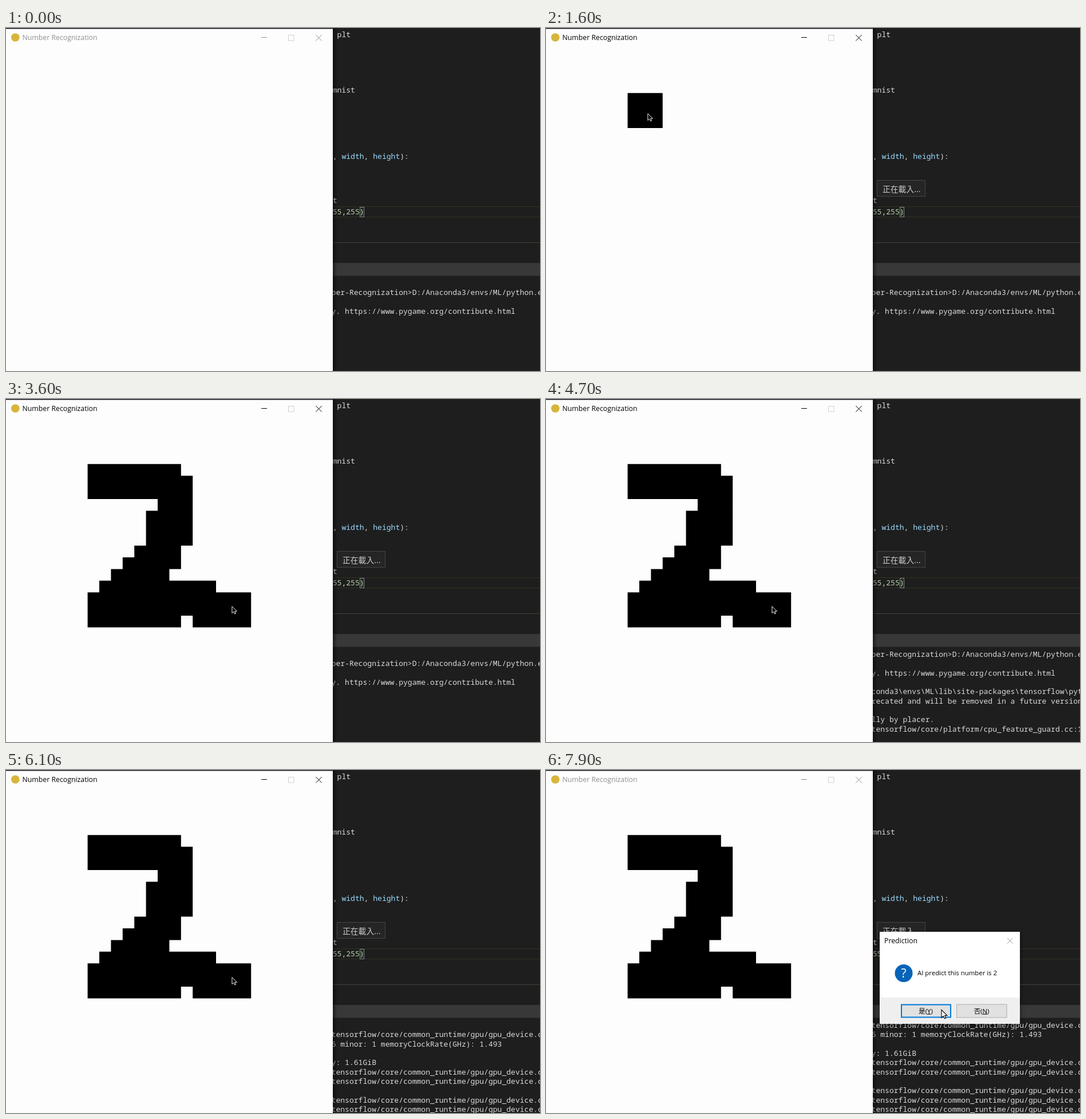
These frames come from a looping animation (933x600 px, 8 s). An HTML page:

```html
<!DOCTYPE html>
<html lang="en">
<head>
<meta charset="utf-8">
<title>Number Recognization</title>
<style>
  html, body { margin: 0; width: 100%; height: 100%; overflow: hidden; background: #1e1e1e; }
  svg { display: block; width: 933px; height: 600px; }
  text { white-space: pre; }
  .code { font: 13.07px "Noto Sans Mono", monospace; fill: #dadada; }
  .ui { font: 12.3px "Open Sans", sans-serif; }
  .small { font: 11.4px "Open Sans", "Noto Sans CJK TC", "Noto Sans CJK", sans-serif; }
  .cjk { font-family: "Noto Sans CJK TC", "Noto Sans CJK", sans-serif; }
  .param { fill: #9cdcfe; }
  .number { fill: #b5cea8; }
  .key { text-decoration: underline; }
  #dialog { filter: drop-shadow(0 2px 4px #0008); }
</style>
</head>
<body>
<svg viewBox="0 0 933 600">
  <defs>
    <linearGradient id="shade">
      <stop stop-color="#000" stop-opacity=".45"/>
      <stop offset="1" stop-color="#000" stop-opacity="0"/>
    </linearGradient>
  </defs>
  <rect width="933" height="600" fill="#1e1e1e"/>

  <!-- editor -->
  <path d="M571 312.5H933M571 330.5H933" stroke="#323226"/>
  <path d="M571 375.5H933" stroke="#42423a"/>
  <rect x="571" y="411" width="362" height="22.5" fill="#383838"/>
  <rect x="618.5" y="313.5" width="7" height="17" fill="#1c2a1c" stroke="#888"/>
  <g class="code">
    <text x="578.6" y="16">plt</text>
    <text x="570.7" y="113">mnist</text>
    <text x="570.7" y="229">, <tspan class="param">width</tspan>, <tspan class="param">height</tspan>):</text>
    <text x="570.7" y="306">t</text>
    <text x="570.7" y="326"><tspan class="number">55</tspan>,<tspan class="number">255</tspan>)</text>
  </g>
  <g id="tooltip">
    <rect x="578.5" y="266.5" width="84" height="28" fill="#252526" stroke="#454545"/>
    <text class="cjk" x="588" y="287" font-size="13.8" fill="#ccc">正在載入...</text>
  </g>
  <g id="terminal" class="code"></g>

  <!-- drawing window -->
  <rect x="571" width="8" height="600" fill="url(#shade)"/>
  <rect width="571" height="2" fill="#15151c"/>
  <rect y="1.5" width="571" height="599" fill="#fdfdfd"/>
  <circle cx="16.3" cy="16.5" r="7.3" fill="#d6b53c"/>
  <g id="titlebar">
    <text class="ui" x="28.5" y="21">Number Recognization</text>
    <path d="M446 16.5H456M541.3 12L551.7 22.4M551.7 12L541.3 22.4" stroke="currentColor" fill="none"/>
  </g>
  <rect x="493.5" y="12.5" width="9.5" height="9.5" fill="none" stroke="#d0d0d0"/>
  <path id="ink"/>

  <!-- message box -->
  <g id="dialog">
    <rect x="583" y="283" width="245" height="161" fill="#fff"/>
    <rect x="583" y="398" width="245" height="46" fill="#efefef"/>
    <text class="ui" x="591" y="302.5">Prediction</text>
    <path d="M806 294L815.5 303.5M815.5 294L806 303.5" stroke="#999"/>
    <circle cx="625" cy="355.5" r="15.5" fill="#0664b8"/>
    <text x="625" y="363" text-anchor="middle" fill="#fff" style="font:21px 'Open Sans',sans-serif">?</text>
    <text class="small" x="649" y="358.5">AI predict this number is 2</text>
    <rect x="621" y="410.5" width="86" height="22" fill="#e1e1e1" stroke="#0078d7" stroke-width="2"/>
    <rect x="717.5" y="410" width="87.5" height="23" fill="#e1e1e1" stroke="#adadad"/>
    <g class="small" text-anchor="middle">
      <text x="663.5" y="425.5">是(<tspan class="key">Y</tspan>)</text>
      <text x="761" y="425.5">否(<tspan class="key">N</tspan>)</text>
    </g>
  </g>
  <path id="cursor" d="M0 0V12.5L3 9.8L5 14L7 13.1L5.1 9H9Z"/>
</svg>
<script>
const $ = id => document.getElementById(id);
const LOOP = 8000, STEP = 100, CELL = 20.4, GRID_LEFT = -.2, GRID_TOP = 32.2, ROWS = 10;
const clamp = v => Math.max(0, Math.min(1, v));
const lerp = (a, b, p) => a + (b - a) * p;

const gpu = 'tensorflow/core/common_runtime/gpu/gpu_device.cc:1';
const log = [
  '', 'ber-Recognization>D:/Anaconda3/envs/ML/python.exe', '',
  'y. https://www.pygame.org/contribute.html', '',
  'conda3\\envs\\ML\\lib\\site-packages\\tensorflow\\pyth',
  'recated and will be removed in a future version.', '',
  'lly by placer.', 'tensorflow/core/platform/cpu_feature_guard.cc:14', '',
  gpu, '6 minor: 1 memoryClockRate(GHz): 1.493', '', 'y: 1.61GiB',
  gpu, gpu, '', gpu, gpu, gpu
];
// [time, lines printed so far]
const printed = [[0, 4], [4000, 7], [4400, 9], [4700, 11], [5100, 13], [5300, 15],
  [5500, 16], [5600, 17], [5900, 18], [6000, 19], [6100, 20], [7100, 21]];

// Brush centres in grid cells, one stamp per cell travelled.
const corners = [[8, 5], [13, 5], [14, 6], [14, 9], [13, 9], [13, 11], [8, 16],
  [13, 16], [14, 15], [16, 15], [17, 16], [19, 16]];
const stamps = [corners[0]];
corners.slice(1).forEach(([x, y], i) => {
  const [px, py] = corners[i], n = Math.max(Math.abs(x - px), Math.abs(y - py));
  for (let k = 1; k <= n; k++) stamps.push([lerp(px, x, k / n), lerp(py, y, k / n)]);
});
const CLICK = 1500, DRAW = 1600, STAMP_MS = 64;

// [time, x, y] of the pointer outside the stroke
const approach = [[200, 940, 420], [600, 604, 304], [900, 596, 300], [1500, 178, 150]];
const leave = [[7400, 395, 363], [7800, 691, 419.5]];

function along(keys, t) {
  const i = Math.max(1, keys.findIndex(k => k[0] >= t));
  const b = t >= keys.at(-1)[0] ? keys.at(-1) : keys[i], a = keys[keys.indexOf(b) - 1];
  const p = clamp((t - a[0]) / (b[0] - a[0])), e = p * p * (3 - 2 * p);
  return [lerp(a[1], b[1], e), lerp(a[2], b[2], e)];
}

function pointer(t) {
  if (t < DRAW) return along(approach, t);
  if (t >= leave[0][0]) return along(leave, t);
  const last = stamps.length - 1, s = Math.min(last, (t - DRAW) / STAMP_MS);
  const i = Math.floor(s), a = stamps[i], b = stamps[Math.min(last, i + 1)], p = s / last;
  return [
    (lerp(a[0], b[0], s - i) + lerp(.72, .36, p)) * CELL,
    GRID_TOP + (lerp(a[1], b[1], s - i) + lerp(.76, .2, p)) * CELL
  ];
}

const rows = Array.from({ length: ROWS }, (_, i) => {
  const row = document.createElementNS('http://www.w3.org/2000/svg', 'text');
  row.setAttribute('x', 568.6);
  row.setAttribute('y', Math.round(451 + i * 16.33));
  return $('terminal').appendChild(row);
});

function render(t) {
  const count = printed.findLast(p => p[0] <= t)[1], top = Math.max(0, count - ROWS);
  rows.forEach((row, i) => row.textContent = top + i < count ? log[top + i] : '');

  $('tooltip').style.display = t >= 900 ? '' : 'none';
  const active = t >= CLICK && t < 7100;
  $('titlebar').style.color = $('titlebar').style.fill = active ? '#000' : '#8f8f8f';

  const inked = t < CLICK ? 0 : Math.max(1, Math.floor((t - DRAW) / STAMP_MS) + 1);
  const side = 3 * CELL;
  $('ink').setAttribute('d', stamps.slice(0, inked).map(([x, y]) =>
    `M${GRID_LEFT + (x - 1) * CELL} ${GRID_TOP + (y - 1) * CELL}h${side}v${side}h${-side}z`).join(''));

  const shown = clamp((t - 7200) / 152), scale = lerp(.94, 1, shown);
  $('dialog').setAttribute('opacity', shown);
  $('dialog').setAttribute('transform',
    `translate(${lerp(704, 705.5, shown)} ${lerp(362, 363.5, shown)}) scale(${scale}) translate(-705.5 -363.5)`);

  const [x, y] = pointer(t), onCanvas = x < 571;
  const cursor = $('cursor');
  cursor.style.display = t < 200 ? 'none' : '';
  cursor.setAttribute('transform', `translate(${x} ${y}) scale(${onCanvas ? .95 : 1.1})`);
  cursor.setAttribute('fill', onCanvas ? '#000' : '#fff');
  cursor.setAttribute('stroke', onCanvas ? '#fff' : '#000');
}

function frame() {
  render(Math.floor(performance.now() % LOOP / STEP) * STEP);
  requestAnimationFrame(frame);
}
frame();
</script>
</body>
</html>
```
